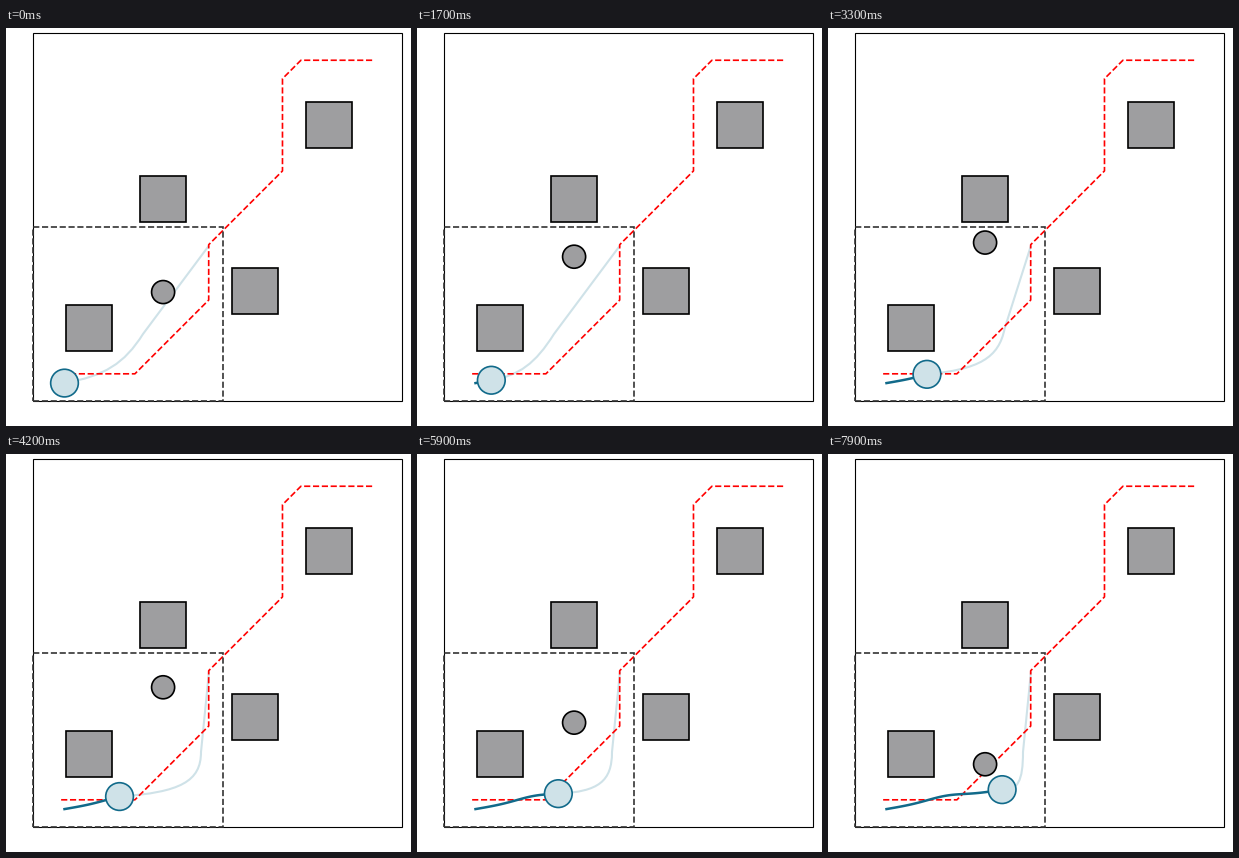
A matplotlib script for the animation above (8000 ms loop, 405 by 398 pixels).

```python
import numpy as np
import matplotlib.pyplot as plt
from matplotlib.animation import FuncAnimation
from matplotlib.patches import Circle, PathPatch, Rectangle
from matplotlib.path import Path

W, H, DPI = 405, 398, 100
FRAMES, STEP_MS = 80, 100
LEFT, TOP, SIDE = 27.47, 4.58, 368.9
UNIT = SIDE / 40

GREY, PALE, TEAL = "#9e9ea0", "#cfe2e8", "#116a8a"


def px(x, y):
    """World units (40 x 40 field) to stage pixels."""
    return np.array([LEFT + x * UNIT, TOP + SIDE - y * UNIT])


def box(x, y, w, h, **style):
    """Rectangle from its lower left corner, in world units."""
    return ax.add_patch(Rectangle(px(x, y), w * UNIT, -h * UNIT, **style))


def disc(center, radius, **style):
    return ax.add_patch(Circle(center, radius * UNIT, lw=1.2, **style))


fig = plt.figure(figsize=(W / DPI, H / DPI), dpi=DPI, facecolor="white")
ax = fig.add_axes([0, 0, 1, 1])
ax.set(xlim=(0, W), ylim=(H, 0))
ax.axis("off")

# Field border, local window, obstacles, global route
box(0, 0, 40, 40, fill=False, ec="black", lw=0.8, zorder=6)
box(0, 0, 20.55, 18.92, fill=False, ec="#333333", lw=1.2, ls="--", zorder=7)

for cx, cy in [(6, 8), (14, 22), (24, 12), (32, 30)]:
    box(cx - 2.5, cy - 2.5, 5, 5, fc=GREY, ec="black", lw=1.2, zorder=4)

route = [(3, 3), (11, 3), (19, 11), (19, 17), (27, 25), (27, 35), (29, 37), (37, 37)]
ax.plot(*zip(*[px(*p) for p in route]), "--", color="red", lw=1.2, zorder=2)


def robot_at(n):
    """Speeds up to a steady pace along a gently swaying climb."""
    run = 1.64 * (n - 8.5 * (1 - np.exp(-n / 8.5)))
    x = 58.5 + run
    y = 355.1 - 0.168 * run - 3.4 * np.exp(-((x - 118) / 26) ** 2)
    return np.array([x, y])


def mover_at(n):
    """Constant speed, bouncing off the upper limit."""
    return 157.1, 205 + 2.08 * abs(n - 28.4)


# A plan rounds a corner, then runs straight to the goal.
# It swings to the other side once the mover turns back.
GOAL = np.array([203, 217.5])
EARLY = np.array([(112, 345.5), (137, 306)])    # corner, end of the bend
LATE = np.array([(195, 337), (195, 298)])
PLAN_CODES = [Path.MOVETO] + [Path.CURVE4] * 3 + [Path.LINETO]


def plan(n):
    s = np.clip((n - 28) / 8, 0, 1)
    corner, end = EARLY + (LATE - EARLY) * s * s * (3 - 2 * s)
    start = robot_at(n)
    handles = [p + 0.75 * (corner - p) for p in (start, end)]
    return Path([start, *handles, end, GOAL], PLAN_CODES)


plan_line = ax.add_patch(PathPatch(plan(0), fill=False, ec=PALE, lw=1.5, zorder=1.5))
trail, = ax.plot([], [], color=TEAL, lw=1.8, zorder=3)
mover = disc(mover_at(0), 1.25, fc=GREY, ec="black", zorder=4)
robot = disc(robot_at(0), 1.5, fc=PALE, ec=TEAL, zorder=5)


def draw(n):
    plan_line.set_path(plan(n))
    trail.set_data(*robot_at(np.arange(n + 1)))
    mover.center = mover_at(n)
    robot.center = tuple(robot_at(n))
    return plan_line, trail, mover, robot


anim = FuncAnimation(fig, draw, frames=FRAMES, interval=STEP_MS,
                     repeat=True, repeat_delay=0, blit=False)
plt.show()
```
